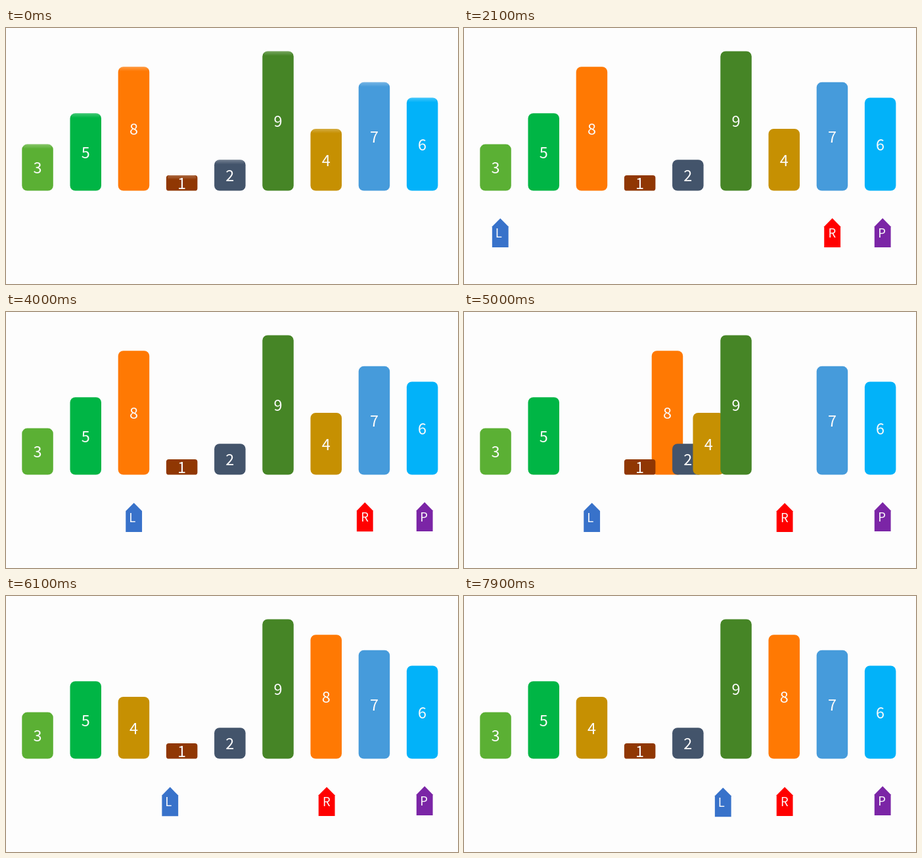
Animation of 688x391 px, one loop 8 s. Source, as an HTML page:

```html
<!DOCTYPE html>
<html lang="en">
<head>
<meta charset="utf-8">
<title>Partition step</title>
<style>
  html, body { margin: 0; width: 100%; height: 100%; overflow: hidden; background: #fdfdfd; }
  svg { display: block; width: 100%; height: 100%; }
  text { font-family: "Noto Sans CJK SC", "Noto Sans CJK JP", "Noto Sans", sans-serif; font-weight: 300; fill: #fbfbfb; text-anchor: middle; }
</style>
</head>
<body>
<svg id="stage" viewBox="0 0 688 391">
  <defs>
    <linearGradient id="shine" x1="0" y1="0" x2="0" y2="1">
      <stop offset="0" stop-color="#fff" stop-opacity=".26"/>
      <stop offset="1" stop-color="#fff" stop-opacity="0"/>
    </linearGradient>
  </defs>
</svg>
<script>
const LOOP = 8000, STEP = 100;      // the picture advances ten times a second
const PITCH = 73.2, BAR_W = 47.5, UNIT = 23.68, FLOOR = 248.6;
const MOVE = 800, FADE = 750;
const SWAP_AT = 4655, RIGHT_AT = 3765;
const LEFT_STARTS = [1940, 2845, 5565, 6475, 7380];

const stage = document.getElementById("stage");

function add(parent, tag, attrs, label) {
  const el = document.createElementNS("http://www.w3.org/2000/svg", tag);
  for (const key in attrs) el.setAttribute(key, attrs[key]);
  if (label !== undefined) el.textContent = label;
  parent.appendChild(el);
  return el;
}

const clamp = v => Math.min(1, Math.max(0, v));
const ease = (t, start) => (1 - Math.cos(Math.PI * clamp((t - start) / MOVE))) / 2;
const fade = (t, start) => clamp((t - start) / FADE);
const slotX = i => 24.3 + i * PITCH;
const slotMid = i => slotX(i) + BAR_W / 2 + 0.2;
const place = (el, x, y) => el.setAttribute("transform", `translate(${x.toFixed(2)} ${y.toFixed(2)})`);

function makeBar(value, color, slot) {
  const h = value * UNIT, top = FLOOR - h, r = Math.min(BAR_W, h) / 6;
  const g = add(stage, "g", {});
  add(g, "rect", { y: top, width: BAR_W, height: h, rx: r, fill: color });
  const shine = add(g, "rect", { x: 2, y: top, width: BAR_W - 4, height: 7, rx: 4, fill: "url(#shine)" });
  add(g, "text", { x: BAR_W / 2, y: FLOOR - h / 2 + 9.4, "font-size": 23.5 }, value);
  place(g, slotX(slot), 0);
  return { g, shine };
}

// Origin at the tip of the pointer.
function makePointer(letter, color, dx) {
  const g = add(stage, "g", {});
  add(g, "path", { d: "M0 0L12.4 12.6V44.4H-12.4V12.6Z", fill: color });
  add(g, "text", { x: dx, y: 29.2, "font-size": 18.5 }, letter);
  return g;
}

const bars = [
  [3, "#5bb034"], [5, "#00b545"], [8, "#ff7903"],
  [1, "#903703"], [2, "#43546b"], [9, "#468526"],
  [4, "#c69002"], [7, "#469bdb"], [6, "#02b2f9"]
].map(([value, color], slot) => makeBar(value, color, slot));
const big = bars[2].g, small = bars[6].g;
stage.insertBefore(small, bars[5].g);   // the 4 passes behind the 9

const left = makePointer("L", "#3872ca", -2.4);
const right = makePointer("R", "#ff0000", -0.2);
const pivot = makePointer("P", "#7b25a6", -1);

function draw(t) {
  for (const bar of bars) bar.shine.setAttribute("opacity", t < STEP ? 1 : 0);

  const swap = ease(t, SWAP_AT) * 4 * PITCH;
  place(big, slotX(2) + swap, 0);
  place(small, slotX(6) - swap, 0);

  const steps = LEFT_STARTS.reduce((sum, start) => sum + ease(t, start), 0);
  place(left, slotMid(0) + steps * PITCH, 290.6 + steps * 0.45);
  const back = ease(t, RIGHT_AT);
  place(right, slotMid(7) - back * 72.5, 290.6 + back * 1.1);
  place(pivot, 637.2, 290.6);

  pivot.setAttribute("opacity", fade(t, 100));
  left.setAttribute("opacity", fade(t, 970));
  right.setAttribute("opacity", fade(t, 970));
}

const began = performance.now();
function tick() {
  const t = (performance.now() - began) % LOOP;
  draw(Math.floor(t / STEP) * STEP);
  requestAnimationFrame(tick);
}
tick();
</script>
</body>
</html>
```
